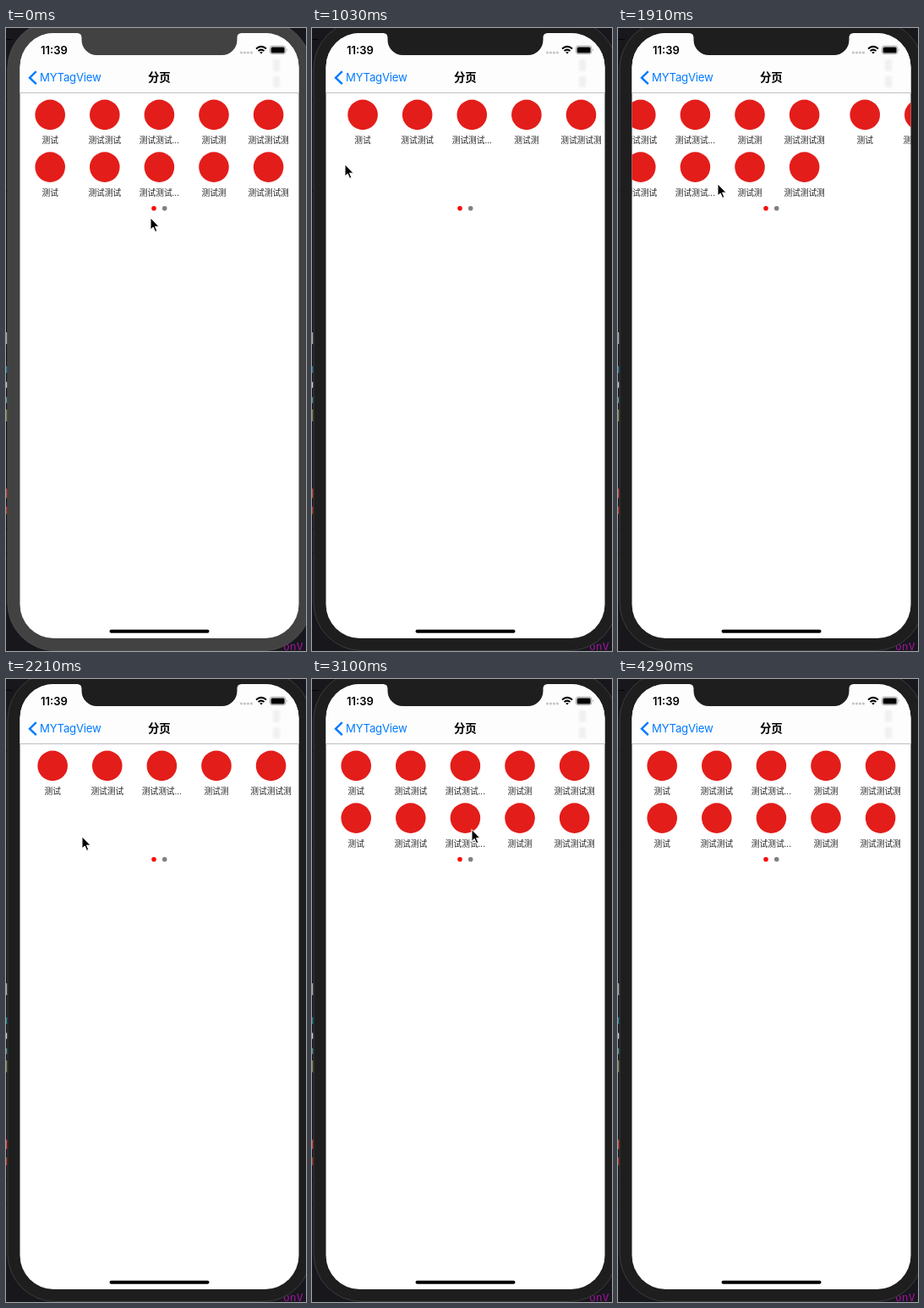
These frames come from a looping animation (355 px wide and 735 px high, 4.44 s). An HTML page:

```html
<!DOCTYPE html>
<html lang="zh">
<head>
<meta charset="utf-8">
<title>分页</title>
<style>
  html, body { margin: 0; width: 100%; height: 100%; overflow: hidden; background: #17171c; }
  svg { display: block; width: 355px; height: 735px; }
  text { font-family: Inter, "Noto Sans CJK SC", "Noto Sans CJK", sans-serif; }
  .case { fill: #1e1e1e; }
  .rim { fill: none; stroke: #3b3b3f; }
  .idle .case { fill: #424242; }
  .idle .rim { stroke: #4a4a4a; }
  .label { font-size: 9.7px; text-anchor: middle; fill: #222; }
  .mono { font: 13px "DejaVu Sans Mono", monospace; }
</style>
</head>
<body>
<svg id="stage" viewBox="0 0 355 735">
  <defs>
    <clipPath id="screen"><rect x="16.5" y="6" width="330" height="714" rx="40"/></clipPath>
    <filter id="soft" x="-100%" y="-50%" width="300%" height="200%"><feGaussianBlur stdDeviation="1.8"/></filter>
  </defs>

  <rect width="355" height="735" fill="#17171c"/>
  <path d="M0 13.5H8M0 85.5H2M0 192.5H2M0 590.5H2M0 619.5H2" stroke="#050507"/>
  <g id="code"></g>
  <text class="mono" x="328" y="734" fill="#a0149c">onV</text>

  <rect class="case" x="1.5" y="-9" width="360" height="744" rx="57"/>
  <rect class="rim" x="2" y="-8.5" width="359" height="743" rx="56.5"/>

  <g clip-path="url(#screen)">
    <rect x="16" y="6" width="331" height="714" fill="#fff"/>
    <g id="pages"></g>
    <rect x="16" y="6" width="331" height="70.5" fill="#fdfdfd"/>
    <path d="M16 76.5H347" stroke="#b9b9bb" stroke-width=".9"/>
    <g filter="url(#soft)" fill="#000" opacity=".05">
      <rect x="316" y="37" width="8" height="14"/>
      <rect x="316" y="57" width="8" height="13"/>
    </g>
    <path class="case" d="M83 5V6C88 6 89.5 8 89.5 12V14A18 18 0 0 0 107.5 32H255.5A18 18 0 0 0 273.5 14V12C273.5 8 275 6 280 6V5Z"/>
  </g>

  <text x="41" y="30.5" font-size="13" font-weight="600">11:39</text>
  <g fill="#c4c4c6">
    <circle cx="278.4" cy="29" r="1.6"/><circle cx="282.4" cy="29" r="1.6"/>
    <circle cx="286.4" cy="29" r="1.6"/><circle cx="290.4" cy="29" r="1.6"/>
  </g>
  <g fill="none" stroke="#000" stroke-width="2">
    <path d="M296 24.4Q302 19.4 308 24.4M298.5 27.1Q302 24.2 305.5 27.1"/>
    <path d="M300.2 28.7Q302 27.4 303.8 28.7L302 30.6Z" fill="#000" stroke="none"/>
  </g>
  <rect x="312.4" y="21.2" width="18.4" height="9.4" rx="2.6" fill="none" stroke="#9a9a9a" stroke-width=".9"/>
  <rect x="313.6" y="22.4" width="16" height="7" rx="1.5"/>
  <path d="M332 24.3Q333.5 25.9 332 27.5Z" fill="#9a9a9a"/>

  <path d="M35.8 51.2L28 58.7L35.8 66.2" fill="none" stroke="#007aff" stroke-width="2.4"/>
  <text x="40" y="63.2" font-size="13.2" letter-spacing="-.25" fill="#007aff">MYTagView</text>
  <text x="181.3" y="63.4" font-size="13.4" font-weight="600" text-anchor="middle">分页</text>

  <circle class="dot" cx="175" cy="212.7" r="2.8"/>
  <circle class="dot" cx="187.7" cy="212.7" r="2.8"/>
  <rect x="122.5" y="709.7" width="118" height="4" rx="2"/>
  <path id="pointer" d="M0 0V14L3.2 11L5.6 16.4L7.8 15.4L5.5 10.2H10Z" stroke="#fff" stroke-width="1"/>
</svg>

<script>
const LOOP = 4440, TICK = 148, PAGE = 330;
const $ = id => document.getElementById(id);
const stage = $('stage'), pages = $('pages'), pointer = $('pointer');
const dots = document.querySelectorAll('.dot');

const linear = u => u;
const easeIn = u => u * u;
const easeOut = u => 1 - (1 - u) ** 2;

// Two full rows on the first page, one on the second.
const names = ['测试', '测试测试', '测试测试...', '测试测', '测试测试测'];
const row = (x0, y) => names.map((name, i) => {
  const x = x0 + 52.2 + i * 64.6;
  return `<circle cx="${x}" cy="${y}" r="17.8" fill="#e31d1a"/>
    <text class="label" x="${x}" y="${y + 33.4}">${name}</text>`;
}).join('');
pages.innerHTML = row(0, 102.4) + row(0, 164.1) + row(PAGE, 102.4);

// Slivers of the editor left of the phone.
$('code').innerHTML = [[366, 14, '#aaa'], [403, 8, '#1683a0'], [421, 7, '#ccc'], [439, 7, '#4d9a8c'],
  [457, 14, '#7d8a4a'], [549, 11, '#e0453a'], [569, 9, '#c0352c']]
  .map(([y, h, c]) => `<rect y="${y - h / 2}" width="1.6" height="${h}" fill="${c}"/>`).join('');

// [time, offset, easing towards it]: drags ease in, flings ease out.
const scroll = [
  [0, 0], [440, 0], [740, 133.5, easeIn], [1110, 330, easeOut],
  [1184, 330], [1332, 276, easeIn], [1628, 0, easeOut],
  [1776, 0], [1924, 90, easeIn], [2257, 330, easeOut],
  [2442, 330], [2590, 225, easeIn], [2997, 0, easeOut], [LOOP, 0]
];
const path = [
  [0, 171, 224], [444, 174, 165], [740, 42, 152, easeIn], [888, 34, 156], [1184, 44, 166],
  [1332, 100, 162], [1480, 198, 164], [1628, 206, 168], [1776, 201, 176], [1924, 118, 184],
  [2072, 92, 187], [2220, 90, 186], [2442, 92, 186], [2590, 188, 181], [2812, 202, 179],
  [3404, 176, 176], [3700, 203, 227], [3848, 238, 330], [4144, 323, 722], [4292, 400, 900], [LOOP, 400, 900]
];

function at(track, t, col = 1) {
  const i = track.findIndex(p => p[0] > t), a = track[i - 1], b = track[i];
  const u = (b[3] || linear)((t - a[0]) / (b[0] - a[0]));
  return a[col] + (b[col] - a[col]) * u;
}
const offsets = scroll.map(([t, x, ease]) => [t, x, 0, ease]);

function draw(now) {
  const tick = Math.min(29, Math.floor((now % LOOP + 16) / TICK));
  const t = tick * TICK, offset = at(offsets, t);
  const page = Math.floor(offset / PAGE);
  stage.classList.toggle('idle', tick === 0);
  pages.setAttribute('transform', `translate(${-offset})`);
  pointer.setAttribute('transform', `translate(${at(path, t)} ${at(path, t, 2)})`);
  dots.forEach((dot, i) => dot.setAttribute('fill', i === page ? '#f90d0d' : '#808080'));
}

const start = performance.now();
function loop() {
  draw(performance.now() - start);
  requestAnimationFrame(loop);
}
loop();
</script>
</body>
</html>
```
